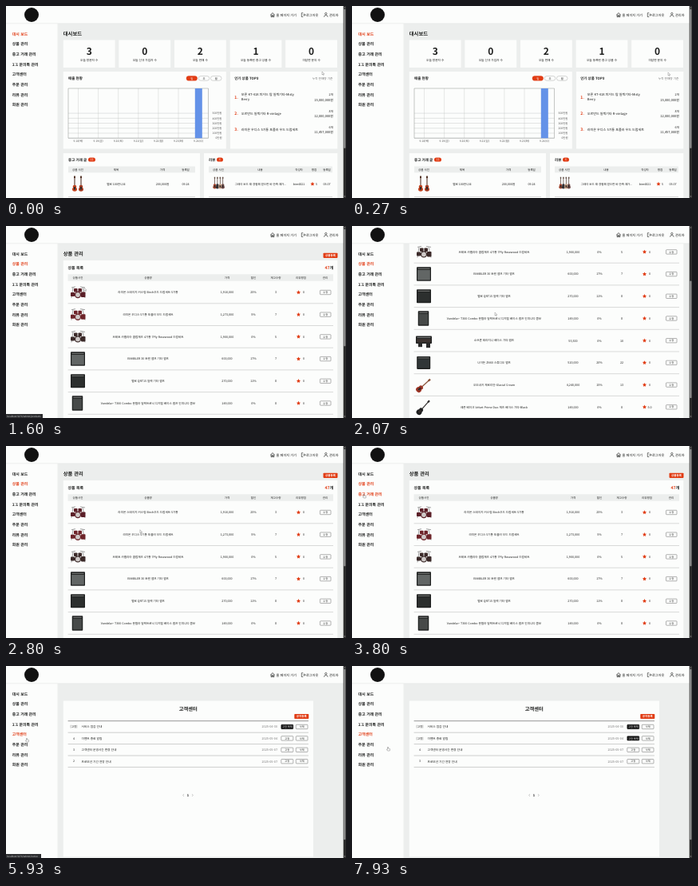
An HTML page for the animation above (8000 ms loop, 426 by 240 pixels).

```html
<!DOCTYPE html>
<html lang="ko">
<head>
<meta charset="utf-8">
<title>관리자</title>
<style>
html, body { margin: 0; width: 100%; height: 100%; overflow: hidden; background: #fcfdfc; }
svg { display: block; width: 100%; height: 100%; }
text { font-family: "Noto Sans CJK KR", "Noto Sans CJK", "Noto Sans", sans-serif; font-weight: 500; text-rendering: geometricPrecision; white-space: pre; }
</style>
</head>
<body>
<svg id="stage" viewBox="0 0 426 240"></svg>
<script>
const LOOP = 8000;
const INK = '#1c1d1c', PAPER = '#fcfdfc', GRAY = '#eceeed', RED = '#e13c14', LINE = '#b4b6b5';

// Drawing helpers: text is placed by its vertical centre
const text = (x, y, s, size = 3.6, { at = 'middle', fill = INK, bold = 0, more = '' } = {}) =>
  `<text x="${x}" y="${y + size * 0.36}" font-size="${size}" text-anchor="${at}" fill="${fill}"${bold ? ' style="font-weight:700"' : ''} ${more}>${s}</text>`;
const left = (x, y, s, size, o) => text(x, y, s, size, { at: 'start', ...o });
const right = (x, y, s, size, o) => text(x, y, s, size, { at: 'end', ...o });
const rect = (x, y, w, h, fill, more = '') => `<rect x="${x}" y="${y}" width="${w}" height="${h}" fill="${fill}" ${more}/>`;
const path = (d, stroke, w = 0.5, fill = 'none') => `<path d="${d}" stroke="${stroke}" stroke-width="${w}" fill="${fill}"/>`;
const hline = (x1, x2, y, color = LINE, w = 0.5) => path(`M${x1} ${y}H${x2}`, color, w);
const disc = (x, y, r, fill, more = '') => `<circle cx="${x}" cy="${y}" r="${r}" fill="${fill}" ${more}/>`;
const title = (s) => left(71.8, 34.3, s, 6.3, { bold: 1 });
const button = (x, y, w, s, fill = PAPER, ink = INK, edge = '#555') =>
  rect(x, y - 2.7, w, 5.4, fill, `rx=".7" stroke="${edge}" stroke-width=".45"`) + text(x + w / 2, y, s, 3.2, { fill: ink });
const redButton = (x, y, s) => rect(x, y - 3.1, 18, 6.2, RED, 'rx=".8"') + text(x + 9, y, s, 3.5, { fill: '#fff', bold: 1 });
const badge = (x, y, w, s) => rect(x, y - 2.6, w, 5.2, RED, 'rx="2.6"') + text(x + w / 2, y, s, 3.4, { fill: '#fff' });

function star(x, y, r = 2.7) {
  let d = '';
  for (let i = 0; i < 10; i++) {
    const a = i * Math.PI / 5 - Math.PI / 2, k = i % 2 ? r * 0.48 : r;
    d += `${i ? 'L' : 'M'}${x + k * Math.cos(a)} ${y + k * Math.sin(a)}`;
  }
  return `<path d="${d}Z" fill="${RED}"/>`;
}

// Thumbnails
const drums = (x, y, c) =>
  path(`M${x - 8} ${y - 6}l5 -1M${x + 3} ${y - 7}l6 1M${x - 6} ${y - 6}L${x - 8} ${y + 7}M${x + 6} ${y - 6}L${x + 9} ${y + 7}`, '#777', 0.7) +
  rect(x - 5, y - 5, 4.5, 4.5, c, 'rx=".8"') + rect(x + 0.5, y - 5, 4.5, 4.5, c, 'rx=".8"') +
  rect(x - 9, y, 5, 5, c, 'rx=".8"') + rect(x + 4, y - 0.5, 5.5, 6.5, c, 'rx=".8"') +
  disc(x, y + 3, 4.2, c) + disc(x, y + 3, 2.9, '#cfcac8');
const amp = (x, y, w, h, face = '#474a49') =>
  rect(x - w / 2, y - h / 2, w, h, '#1f2120', 'rx=".8"') +
  rect(x - w / 2 + 1.2, y - h / 2 + 3.6, w - 2.4, h - 5, face) +
  hline(x - w / 2 + 1.5, x + w / 2 - 1.5, y - h / 2 + 2, '#a2a4a3', 0.7);
const guitar = (x, y, turn, body, neck = '#6b3b22', k = 1) =>
  `<g transform="translate(${x} ${y}) rotate(${turn}) scale(${k})">` +
  rect(-0.6, -12, 1.2, 14, neck) + rect(-1.1, -13.5, 2.2, 3, neck) +
  `<ellipse cy="2.2" rx="2.7" ry="2.5" fill="${body}"/><ellipse cy="6" rx="3.5" ry="3.2" fill="${body}"/>` +
  rect(-1.2, 2.5, 2.4, 4, '#312b29') + '</g>';
const pair = (x, y) => guitar(x - 4, y + 1, 0, '#c4431f', '#4a2a1c', 0.85) + guitar(x + 4, y + 1, 0, '#a83a20', '#4a2a1c', 0.85);
const photo = (y, base, a, b) =>
  rect(79.5, y - 10, 20, 20, base) + rect(79.5, y + 3, 20, 7, a) + rect(86, y - 7, 8, 12, b, 'rx="2"');

// Pages
function dashboard() {
  let s = title('대시보드');
  const stats = [[3, '오늘 방문자 수'], [0, '오늘 신규 가입자 수'], [2, '오늘 판매 수'], [1, '오늘 등록된 중고 상품 수'], [0, '미답변 문의 수']];
  stats.forEach(([n, label], i) => {
    const x = 71.8 + i * 69.6;
    s += rect(x, 42.5, 64.8, 34.5, PAPER) + text(x + 32.4, 56.5, n, 12, { bold: 1 }) + text(x + 32.4, 68, label, 3.7);
  });

  s += rect(71.8, 82, 204, 96.5, PAPER) + left(78, 90.3, '매출 현황', 4.5, { bold: 1 });
  ['일', '주', '월'].forEach((d, i) => {
    s += rect(226 + i * 15.2, 87.6, 13.6, 5.6, i ? PAPER : RED, `rx="2.8" stroke="${i ? '#999' : RED}" stroke-width=".4"`) +
      text(232.8 + i * 15.2, 90.4, d, 3.3, { fill: i ? INK : '#fff' });
  });
  [...'목금토일월화수'].forEach((d, i) => {
    const x = 90.5 + i * 25.1;
    s += path(`M${x} 103V165.2`, '#c5c7c6', 0.4) + text(x, 168.3, `9.${18 + i}(${d})`, 3.4, { fill: '#555' });
  });
  for (let i = 0; i < 6; i++) {
    const y = 165.2 - i * 6.22;
    s += hline(78, 253.5, y, '#b9bbba', 0.4) + right(270.5, y, i ? i + '00만원' : '0만원', 3.4, { fill: '#555' });
  }
  s += path('M78 103H253.5V165.2H78Z', '#8e908f', 0.5) + rect(236.8, 103, 9, 62.2, '#6492e8');

  s += rect(281, 82, 134.3, 96.5, PAPER) + left(286.3, 90.3, '인기 상품 TOP3', 4.4, { bold: 1 }) +
    right(409.5, 90.3, '누적 판매량 기준', 3.7, { fill: '#777' });
  const top = [
    [114, ['모른 KT-418 피거드 탑 일렉기타-Misty', 'Berry'], '2개', '15,000,000원'],
    [134.5, ['오르만드 일렉기타 R-vintage'], '8개', '12,000,000원'],
    [154.2, ['라미온 우디스 5기통 포플러 우드 드럼세트'], '6개', '11,457,000원']];
  top.forEach(([y, names, n, sum], i) => {
    s += left(286.3, y, i + 1 + '.', 5, { fill: RED, bold: 1 });
    names.forEach((v, j) => s += left(294.8, y + (j - (names.length - 1) / 2) * 6, v, 4.05));
    s += right(410, y - 3, n, 3.7) + right(410, y + 3.2, sum, 4);
  });

  s += rect(71.8, 184, 171.2, 60, PAPER) + left(78, 192, '중고 거래 글', 4.5, { bold: 1 }) + badge(103, 192, 9, '12') + rect(78, 200.5, 159, 7.8, GRAY);
  [['상품 사진', 90], ['제목', 138], ['가격', 196], ['등록일', 225]].forEach(([v, x]) => s += text(x, 204.4, v, 3.5));
  s += pair(90, 223) + text(138, 222.5, '벨로 100만나요', 3.6) + text(196, 222.5, '200,000원', 3.7) + text(225, 222.5, '09.24', 3.7) + hline(78, 237, 238.5);

  s += rect(248, 184, 167.3, 60, PAPER) + left(254, 192, '리뷰', 4.5, { bold: 1 }) + badge(264, 192, 8, '6') + rect(254, 200.5, 155, 7.8, GRAY);
  [['상품 사진', 266], ['내용', 318.5], ['작성자', 367], ['평점', 386], ['등록일', 402]].forEach(([v, x]) => s += text(x, 204.4, v, 3.5));
  ['#a8472f', '#30333a', '#c9a184', '#6e4b49'].forEach((c, i) => s += guitar(261.5 + i * 3.4, 222.5, 0, c, '#5e4a41', 0.65));
  s += text(319, 222.5, '그레이 보드 때 경험해 받으면 바 만족 때가...', 3.5) + text(367, 222.5, 'bim4821', 3.6) +
    star(384, 222.5) + text(389, 222.5, '5', 3.6) + text(402, 222.5, '05.07', 3.7) + hline(254, 409, 238.5);
  return s;
}

const ROW = 27.7;
function list(name, count, edge, heads, rows, height) {
  let s = title(name) + rect(71.8, 43, 343.5, height, PAPER) + left(77.6, 52, '상품 목록', 4.9, { bold: 1 }) +
    `<text x="${edge}" y="54" font-size="5" text-anchor="end" style="font-weight:700" fill="${INK}"><tspan fill="${RED}">${count}</tspan>개</text>` +
    rect(77.6, 60.3, edge - 77.6, 8.4, GRAY);
  heads.forEach(([v, x]) => s += text(x, 64.5, v, 3.5));
  rows.forEach((row, i) => {
    const y = 83 + i * ROW;
    s += row(y) + hline(77.6, edge, y + 13.8);
  });
  return s;
}

function products() {
  const heads = [['상품사진', 90], ['상품명', 178], ['가격', 277], ['할인', 310], ['재고수량', 338], ['리뷰평점', 369.5], ['관리', 400]];
  const items = [
    ['라미온 스테이지 커스텀 Birch우드 드럼세트 5기통', '1,910,000', 25, 3, y => drums(90, y, '#5b2028')],
    ['라미온 우디스 5기통 포플러 우드 드럼세트', '1,273,000', 5, 7, y => drums(90, y, '#6d2429')],
    ['브레토 카멜리아 클럽재즈 4기통 7Ply Rosewood 드럼세트', '1,900,000', 0, 5, y => drums(90, y, '#3b2a29')],
    ['RAMBLER 30 토렌 앰프 기타 앰프', '600,000', 17, 7, y => amp(90, y, 18, 17.5, '#626665')],
    ['벨로 QRT15 일렉 기타 앰프', '270,000', 11, 8, y => amp(90, y, 18, 17, '#2c2f2e')],
    ['Vundelar- T300 Combo 분델라 일렉트로닉 디지털 베이스 앰프 인피니티 콤보', '149,000', 0, 8, y => amp(89.5, y, 13.5, 18.5)],
    ['소브론 테라지니 베이스 기타 앰프', '55,500', 0, 10, y => amp(90, y - 1, 20, 9.5, '#3c3330') + rect(83, y + 3, 5, 5, '#2a2a2a') + rect(93, y + 3, 5, 6, '#2a2a2a')],
    ['나이든 ZN60 스튜디오 앰프', '520,000', 20, 22, y => amp(89.7, y, 17, 16, '#303637')],
    ['오도네키 제로리안-Glacial Cream', '4,240,000', 15, 13, y => guitar(88, y + 2, 48, '#9c3425', '#875036')],
    ['레존 베이크 Velvet Prime Duo 재즈 베이스 기타-Black', '149,000', 0, 8, y => guitar(88, y + 2, 42, '#1e1f20', '#33302f'), '5.0']];
  const rows = items.map(([name, price, off, stock, pic, rate = '0']) => y =>
    pic(y) + text(178, y, name, 3.6) + text(277, y, price, 3.7) + text(310, y, off + '%', 3.7) + text(338, y, stock, 3.7) +
    star(366.5, y) + text(373, y, rate, 3.7) + button(393.5, y, 13.5, '수정'));
  return list('상품 관리', 47, 410, heads, rows, 330) + redButton(397.5, 36.8, '상품등록');
}

function used() {
  const heads = [['상품 사진', 90], ['제목', 165], ['가격', 240], ['작성자', 272], ['등록일', 300], ['거래유형', 324], ['상태', 348], ['정보', 371], ['관리', 395]];
  const free = '무료배송', paid = '배송비 별도';
  const items = [
    ['인트로듀스 하고 입니다 하나가 들어가 봅니다~~', '200,000', 'bim12', '05.24', free, y => pair(90, y)],
    ['테스트에 과연 성공할까 드럼채', '33,000', 'bim12', '08.16', free, y => rect(79.5, y - 10, 20, 20, '#eaf3ee') + text(89.5, y, 'PIANO', 6.4, { fill: '#25a366', bold: 1 })],
    ['안 써서 팔아요 ㅎㅎ', '100,000,000', 'bim4821', '05.28', free, y => photo(y, '#a58d59', '#6c5a3d', '#d4c291')],
    ['~ 및 드럼세트 배터리 BO5 상황에도 하기와 사운드 좋고요 플레인 있습니다. 하지...', '1,100,000', 'bim4821', '05.27', paid, y => photo(y, '#5b4779', '#322a45', '#a38bb8')],
    ['모즈와일 RD4 68건반 21년 구입 스피커포함', '1,690,000', 'bim4821', '05.25', paid, y => photo(y, '#8b8984', '#252626', '#3d3c3b')],
    ['우리 첫 주인, 의견 1급 입니다 약점은 없는, 라이브 시 1-2번 사용했습니다 기본 ...', '910,000', 'bim4821', '05.20', free, y => photo(y, '#b8812d', '#533653', '#dfb65e')]];
  const rows = items.map(([name, price, who, day, ship, pic]) => y =>
    pic(y) + text(165, y, name, 3.5) + text(240, y, price, 3.7) + text(272, y, who, 3.6) + text(300, y, day, 3.7) +
    text(324, y, ship, 3.6) + text(348, y, '판매중', 3.6) + button(364.5, y, 13.5, '더보기') + button(388.5, y, 13.5, '삭제'));
  return list('중고 거래 관리', 12, 409.5, heads, rows, 200);
}

function help(pins) {
  let s = rect(71.8, 43.5, 313.2, 195, PAPER) + text(228.3, 53.5, '고객센터', 6.3, { bold: 1 }) + redButton(361.3, 63, '공지등록') + hline(77.6, 379, 68.7, '#555', 0.6);
  const posts = [['서비스 점검 안내', '04-30'], ['이벤트 종료 알림', '05-04'], ['고객센터 운영시간 변경 안내', '05-07'], ['프로모션 기간 연장 안내', '05-07']];
  posts.forEach(([name, day], i) => {
    const y = 76 + i * 14.4, pin = i < pins;
    s += text(85, y, pin ? '[고정]' : 4 - i + pins, 3.6) + left(94.5, y, name, 3.7) + right(340, y, '2025-' + day, 3.8, { fill: '#777' }) +
      (pin ? button(344.8, y, 15, '고정 해제', '#111', '#fff', '#111') : button(344.8, y, 15, '고정')) +
      button(363.3, y, 14.7, '삭제') + hline(77.6, 379, y + 7.2, '#9c9e9d', 0.5);
  });
  return s + text(228, 161.5, '1', 4, { bold: 1 }) + path('M223 160l-1.3 1.5 1.3 1.5M233 160l1.3 1.5-1.3 1.5', '#888', 0.45);
}

const MENU = ['대시 보드', '상품 관리', '중고 거래 관리', '1:1 문의톡 관리', '고객센터', '주문 관리', '리뷰 관리', '회원 관리'];
const menuY = i => 35 + i * 12.64;

function frame() {
  return rect(0, 22, 64.5, 218, PAPER) + rect(0, 0, 423, 22, PAPER) + hline(0, 423, 21.8, '#dcdedd', 0.5) +
    disc(32, 11, 9, '#111') +
    path('M331.3 11.2L334 8.6l2.7 2.6M332.2 10.6v3.1h1.2v-2h1.2v2h1.2v-3.1', INK, 0.7) + left(338.6, 11, '홈 페이지 가기', 4.2) +
    path('M372.3 8.7h-2v4.8h2M371.8 11.1h3.2M373.7 9.6l1.5 1.5-1.5 1.5', INK, 0.6) + left(376, 11, '로그아웃', 4.2) +
    disc(400.8, 9.6, 1.2, 'none', `stroke="${INK}" stroke-width=".6"`) + path('M398.5 13.7q0 -2.2 2.3 -2.2t2.3 2.2', INK, 0.6) + left(405, 11, '관리자', 4.2) +
    MENU.map((m, i) => left(7.8, menuY(i), m, 4.9, { bold: 1, more: 'class="menu"' })).join('');
}

const ARROW = path('M0 0V3.9L.95 3.1 1.6 4.5 2.2 4.2 1.6 2.9H2.8Z', '#222', 0.25, '#fff');
const HAND = path('M-.4 .4Q0 -.4 .4 .4V2L2.4 2.5Q2.8 2.7 2.6 3.4L2.2 5H-.4L-1.6 3.3Q-1.5 2.6 -.4 3.2Z', '#222', 0.3, '#fff');

const group = (id, body) => `<g id="${id}">${body}</g>`;
const stage = document.getElementById('stage');
stage.innerHTML = rect(0, 0, 426, 240, GRAY) +
  [dashboard(), products(), used(), help(1), help(2)].map((p, i) => group('page' + i, p)).join('') + frame() +
  rect(422.7, 0, 3.3, 240, '#2c2c2c') + path('M423.5 2.4l.9 -1.3 .9 1.3ZM423.5 237.6l.9 1.3 .9 -1.3Z', 'none', 0, '#9f9f9f') +
  `<rect id="thumb" x="423.4" width="1.9" rx=".9" fill="#9f9f9f"/>` +
  group('status', rect(0, 235, 0, 5, '#2b2c2e', 'id="statusBox"') + left(1, 237.5, '', 2.9, { fill: '#d5d6d8', more: 'id="url"' })) +
  group('arrow', ARROW) + group('hand', HAND);

const $ = id => document.getElementById(id);
const pages = [0, 1, 2, 3, 4].map(i => $('page' + i));
const items = [...document.querySelectorAll('.menu')];
const show = (el, on) => el.setAttribute('display', on ? 'inline' : 'none');

// Timeline
const SWITCH = [0, 1270, 4000, 5330, 7000];
const HEIGHT = [320, 380, 310, 261, 261];
const SCROLL = [[1780, 0], [2050, 106], [2200, 106], [2600, 0]];
const MOVES = [[0, 396, 82], [730, 396, 85], [1130, 16, 46], [1400, 16, 46], [1800, 179, 108], [2650, 179, 108], [3600, 15, 60],
  [4200, 15, 60], [4650, 21, 74], [5000, 21, 74], [5280, 25, 87], [5900, 26, 90], [6130, 26, 90], [6700, 352, 89], [7040, 352, 89], [7800, 45, 101]];
const STATUS = [[1200, 1800, 'products', 46], [3950, 4600, 'used-market', 49], [4600, 5280, 'question-talk', 50], [5280, 6250, 'notice', 44]];

const ease = k => k * k * (3 - 2 * k);
function track(keys, t, col) {
  if (t <= keys[0][0]) return keys[0][col];
  for (let i = 1; i < keys.length; i++) {
    const a = keys[i - 1], b = keys[i];
    if (t < b[0]) return a[col] + (b[col] - a[col]) * ease((t - a[0]) / (b[0] - a[0]));
  }
  return keys[keys.length - 1][col];
}

function render(t) {
  const page = SWITCH.filter(s => t >= s).length - 1;
  const scroll = page === 1 ? track(SCROLL, t, 1) : 0;
  pages.forEach((p, i) => show(p, i === page));
  pages[1].setAttribute('transform', `translate(0 ${-scroll})`);
  $('thumb').setAttribute('y', 3.8 + scroll * 232 / HEIGHT[page]);
  $('thumb').setAttribute('height', 232 * 240 / HEIGHT[page]);

  const x = track(MOVES, t, 1), y = track(MOVES, t, 2);
  const active = [0, 1, 2, 4, 4][page];
  items.forEach((m, i) => {
    const over = x > 7 && x < 40 && Math.abs(y - menuY(i)) < 5;
    m.setAttribute('fill', over || i === active ? RED : INK);
  });
  const link = x < 64 || (page > 2 && x > 344 && x < 360);
  show($('arrow'), !link);
  show($('hand'), link);
  $(link ? 'hand' : 'arrow').setAttribute('transform', `translate(${x} ${y})`);

  const tip = STATUS.find(([from, to]) => t >= from && t < to);
  show($('status'), tip);
  if (tip) {
    $('statusBox').setAttribute('width', tip[3]);
    $('url').textContent = 'localhost:5173/admin/' + tip[2];
  }
}

function tick() {
  render(performance.now() % LOOP);
  requestAnimationFrame(tick);
}
tick();
</script>
</body>
</html>
```
